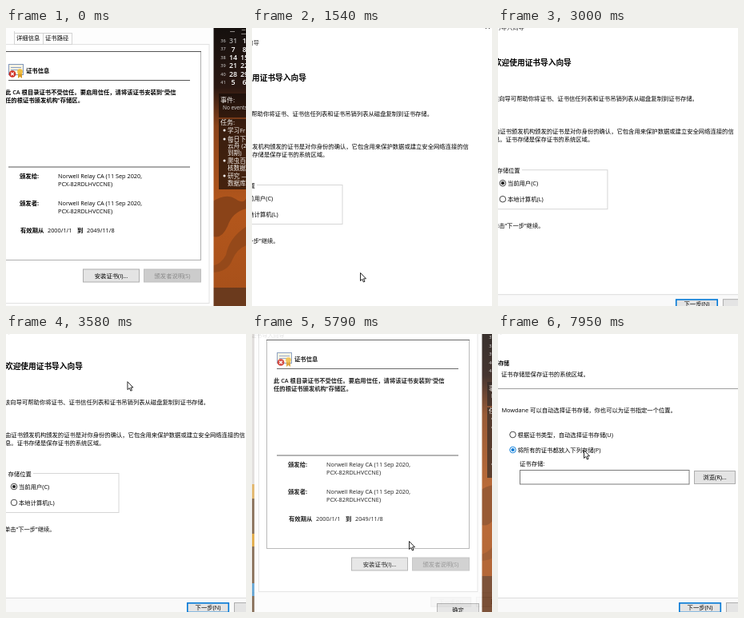
An HTML page that plays this animation: 300 by 348 pixels, repeating every 8000 ms.

```html
<!DOCTYPE html>
<html lang="zh-CN">
<head>
<meta charset="utf-8">
<title>证书导入向导</title>
<style>
  html, body { margin: 0; width: 100%; height: 100%; overflow: hidden; background: #fff; }
  svg { display: block; width: 100vw; height: 100vh; }
  text { font-family: "Open Sans", "Noto Sans CJK SC", "Noto Sans CJK", sans-serif; white-space: pre; }
</style>
</head>
<body>
<svg id="stage" viewBox="0 0 300 348"></svg>
<script>
const LOOP = 8000;
const SIZE = 7.32;
const BLUE = '#0078d7';
const PAPER = '#fdfdfd';

// Drawing helpers; text is placed by its vertical centre.
const text = (x, y, str, { size = SIZE, fill = '#000', weight = 400, anchor = 'start', id = '' } = {}) =>
  `<text id="${id}" x="${x}" y="${y + size * 0.37}" font-size="${size}" font-weight="${weight}" fill="${fill}" text-anchor="${anchor}">${str}</text>`;
const box = (x, y, w, h, fill, stroke = 'none', sw = 1, id = '') =>
  `<rect id="${id}" x="${x}" y="${y}" width="${w}" height="${h}" fill="${fill}" stroke="${stroke}" stroke-width="${sw}"/>`;
const line = (x1, y1, x2, y2, stroke) =>
  `<path d="M${x1} ${y1}L${x2} ${y2}" stroke="${stroke}" stroke-width="1" fill="none"/>`;
const button = (id, x, y, w, h, label, off = false) =>
  box(x + .5, y + .5, w - 1, h - 1, off ? '#ccc' : '#e4e4e4', off ? '#bfbfbf' : '#adadad', 1, id) +
  text(x + w / 2, y + h / 2, label, { anchor: 'middle', fill: off ? '#8a8a8a' : '#000', id: id + 'Label' });
const radio = (id, x, y, label) =>
  `<g id="${id}"><circle cx="${x}" cy="${y}" r="3.8" fill="#fff" stroke="#333" stroke-width=".9"/>
   <circle class="dot" cx="${x}" cy="${y}" r="2.1" fill="#222"/></g>` + text(x + 6, y, label);

function desktop() {
  const weeks = [[36, 31, 1], [37, 7, 8], [38, 14, 15], [39, 21, 22], [40, 28, 29], [41, 5, 6]];
  const white = { fill: '#f4f0ec' };
  const tasks = ['学习Fr', '每日下', '云舟 (2', '到期)', '爬虫百', '核数据', '研究 —', '数据库'];
  const bullets = [0, 1, 4, 6];
  const taskY = [106, 117, 125, 134, 144, 153, 163, 172];
  return `<defs><linearGradient id="sky" x1="0" y1="0" x2="0" y2="1">
      <stop offset="0" stop-color="#15100e"/><stop offset=".2" stop-color="#2b1812"/>
      <stop offset=".33" stop-color="#8a431a"/><stop offset=".6" stop-color="#b4571c"/>
      <stop offset="1" stop-color="#a34e1a"/></linearGradient></defs>
    <g transform="translate(-1 0)">` +
    box(286, -22, 60, 372, 'url(#sky)') +
    `<path d="M286 196Q304 184 316 192T330 188V204Q312 208 306 226Q298 244 286 238Z" fill="#8a4318"/>
     <path d="M330 226Q308 240 304 262Q298 274 286 276V284Q306 284 312 268Q318 254 330 250Z" fill="#95491a"/>` +
    box(286, 303, 60, 47, '#6b3a1d') +
    box(295, 60, 40, 30, '#120b08aa') + box(295, 92, 40, 88, '#120b08aa') +
    text(312, -17, '一', { size: 6.5, ...white, anchor: 'middle' }) +
    text(326, -17, '二', { size: 6.5, ...white, anchor: 'middle' }) +
    weeks.map((row, i) => {
      const y = -6 + i * 10.4;
      const day = { size: 8.8, weight: 600, anchor: 'middle' };
      return text(300.5, y, row[0], { size: 5.6, fill: '#ddd', anchor: 'middle' }) +
        text(313, y, row[1], { ...day, fill: i ? '#fff' : '#aaa' }) +
        text(327, y, row[2], { ...day, fill: '#fff' });
    }).join('') +
    text(297, 68, '事件:', { size: 8, ...white }) +
    text(300, 78, 'No events', { size: 6.5, fill: '#ddd' }) +
    text(297, 96, '任务:', { size: 8, ...white }) +
    tasks.map((s, i) => text(306, taskY[i], s, { size: 7.6, ...white })).join('') +
    bullets.map(i => `<circle cx="302" cy="${taskY[i]}" r="1.5" fill="#fff"/>`).join('') + '</g>' +
    box(-2, -22, 6, 210, '#dedbd8') + box(-2, 188, 6, 162, '#80664d') +
    box(-2, 188, 5, 18, '#e0b060') + box(-2, 250, 5, 16, '#e0a53a') + box(-2, 312, 5, 16, '#5a9fd0');
}

function certificate() {
  const bold = { weight: 700 };
  const issuer = y => text(93, y, 'Norwell Relay CA (11 Sep 2020,') + text(93, y + 10, 'PCX-82RDLHVCCNE)');
  return box(3, -60, 284.5, 440, PAPER) +
    box(8.5, -1.5, 273.5, 324, '#fff', '#e2e2e2') +
    line(38.5, -18, 38.5, -2, '#d4d4d4') +
    box(38.5, -15.5, 36, 14, PAPER, '#d4d4d4') + text(41, -9.5, '详细信息') +
    box(74.5, -15.5, 36, 14, PAPER, '#d4d4d4') + text(77, -9.5, '证书路径') +
    box(18.5, 7.5, 253, 261, '#fff', '#b0b0b0') + line(18, 7.5, 272, 7.5, '#555') +
    line(31, 43.5, 258, 43.5, '#555') + line(31, 152, 258, 152, '#555') +
    box(31.5, 23.5, 18, 13, '#f8f3e2', '#7f96ba') +
    line(34, 27.5, 47, 27.5, '#8aa0c4') + line(34, 30.5, 43, 30.5, '#8aa0c4') +
    `<path d="M43 34V41L45.5 39L48 41V34Z" fill="#d99b25"/><circle cx="45.5" cy="32.5" r="3.3" fill="#efbd42"/>
     <circle cx="36" cy="35.5" r="4.3" fill="#cf2f24"/>
     <path d="M34.2 33.7l3.600 3.600m0-3.600l-3.600 3.600" stroke="#fff" stroke-width="1.3"/>` +
    text(53, 31, '证书信息', bold) +
    text(27, 58, '此 CA 根目录证书不受信任。要启用信任，请将该证书安装到“受信', { weight: 600 }) +
    text(27, 68, '任的根证书颁发机构”存储区。', { weight: 600 }) +
    text(45, 163, '颁发给:', bold) + issuer(163) +
    text(45, 197, '颁发者:', bold) + issuer(197) +
    text(46, 231, '有效期从', bold) + text(80, 231, '2000/1/1') +
    text(117, 231, '到', bold) + text(129, 231, '2049/11/8') +
    button('install', 124, 279.5, 71, 17, '安装证书(I)...') +
    button('issuerNote', 200, 279.5, 72, 17, '颁发者说明(S)', true) +
    button('ok', 231, 337, 53, 16, '确定');
}

const welcomePage = () =>
  text(-1, 40, '欢迎使用证书导入向导', { size: 9.7, weight: 700 }) +
  text(-2, 85.5, '该向导可帮助你将证书、证书信任列表和证书吊销列表从磁盘复制到证书存储。') +
  text(-1, 126, '由证书颁发机构颁发的证书是对你身份的确认，它包含用来保护数据或建立安全网络连接的信') +
  text(-1, 136, '息。证书存储是保存证书的系统区域。') +
  box(-4.5, 174.5, 145.5, 49, 'none', '#d6d6d6') +
  box(0, 170, 34, 9, '#fff') + text(2.5, 175, '存储位置') +
  radio('user', 10, 191, '当前用户(C)') + radio('machine', 10, 211, '本地计算机(L)') +
  text(-2, 244.5, '单击“下一步”继续。');

const storePage = () =>
  text(14, 37, '证书存储', { size: 6.5, weight: 700, anchor: 'end' }) +
  text(4, 50.5, '证书存储是保存证书的系统区域。') +
  line(-60, 68.5, 400, 68.5, '#a0a0a0') +
  text(4.5, 95, 'Mowdane 可以自动选择证书存储，你也可以为证书指定一个位置。') +
  radio('auto', 18.5, 126, '根据证书类型，自动选择证书存储(U)') +
  radio('manual', 18.5, 145, '将所有的证书都放入下列存储(P)') +
  text(27, 162, '证书存储:', { id: 'storeLabel' }) +
  box(27.5, 170.5, 211.5, 17.5, '#fff', '#7a7a7a', 1, 'storeField') +
  button('browse', 245, 171, 52, 17, '浏览(R)...');

const wizard = () =>
  box(-60, -40, 460, 371, '#fff') +
  text(37, -4, '证书导入向导', { anchor: 'end', fill: '#333' }) +
  '<path d="M320 -26l5 5m0-5l-5 5" stroke="#222" stroke-width=".9"/>' +
  `<g id="welcome">${welcomePage()}</g><g id="store">${storePage()}</g>` +
  box(-60, 330, 460, 60, '#f9f9f9') + line(-60, 330.5, 400, 330.5, '#dcdcdc') +
  box(226.8, 336.8, 51.5, 11.6, '#e4e4e4', BLUE, 1.6, 'next') +
  text(252.5, 342.5, '下一步(N)', { anchor: 'middle', id: 'nextLabel' }) +
  `<g id="shield"><path d="M236 337.5Q238 339 240.3 338.7Q240.6 345 236 347Q231.4 345 231.7 338.7Q234 339 236 337.5Z" fill="#2c6fc4"/>
   <path d="M236 337.5Q238 339 240.3 338.7V342.3H236ZM231.7 342.3H236V347Q232 345 231.7 342.3Z" fill="#f5c12e"/></g>` +
  button('cancel', 285, 336, 53, 13, '取消');

document.getElementById('stage').innerHTML =
  `<g id="world">${desktop()}${certificate()}<g id="wizard">${wizard()}</g></g>
   <path id="cursor" d="M.5 .5V10.5L2.8 8.4L4.4 12L6 11.3L4.5 7.8H7.5Z" fill="#fff" stroke="#111" stroke-width=".9"/>`;

const $ = id => document.getElementById(id);
const set = (id, attrs) => { for (const k in attrs) $(id).setAttribute(k, attrs[k]); };
const show = (id, on) => { $(id).style.display = on ? '' : 'none'; };

// Progress in n equal jumps, the first at a and the last at b.
const steps = (t, a, b, n) =>
  t < a ? 0 : Math.min(1, (Math.floor((t - a) * (n - 1) / (b - a) + 1e-6) + 1) / n);
const easeOut = (p, k = 2) => 1 - (1 - p) ** k;

// from, to, jumps, start x, y, end x, y
const moves = [
  [60, 480, 7, 160, 352, 135, 309],
  [1240, 1310, 2, 135, 309, 135, 306],
  [1600, 2050, 7, 135, 306, -40, 226],
  [3450, 4190, 11, 205, 4, 10, 205],
  [4320, 4690, 6, 10, 205, 228, 312],
  [4760, 5060, 5, 228, 312, 256, 343],
  [5270, 5430, 3, 256, 343, 196, 259],
  [6400, 6470, 2, 196, 259, 188, 269],
  [6930, 7520, 9, 188, 269, 100, 143],
  [7670, 7740, 2, 100, 143, 107, 145],
];

function placeCursor(t) {
  const [a, b, n, x0, y0, x1, y1] = moves.findLast(m => m[0] <= t) || moves[0];
  const p = easeOut(steps(t, a, b, n), 1.6);
  set('cursor', { transform: `translate(${x0 + (x1 - x0) * p} ${y0 + (y1 - y0) * p})` });
}

function setRadio(id, on, hot) {
  const [ring, dot] = $(id).children;
  ring.setAttribute('stroke', hot ? BLUE : '#333');
  dot.setAttribute('fill', hot ? BLUE : '#222');
  dot.setAttribute('visibility', on ? 'inherit' : 'hidden');
}

function placeWizard(t) {
  let opacity, scale;
  if (t >= 5650 && t < 6090) {
    const p = steps(t, 5650, 5870, 4);
    opacity = (1 - p) ** 3;
    scale = 1 - 0.07 * p;
  } else {
    opacity = easeOut(t < 5650 ? steps(t, 560, 850, 5) : steps(t, 6090, 6470, 6), 3);
    scale = 1 - 0.08 * (1 - opacity);
  }
  set('wizard', { opacity, transform: `translate(140 140) scale(${scale}) translate(-140 -140)` });
}

function render(t) {
  const pan = 1 - easeOut(steps(t, 2520, 3280, 12), 2.2);
  set('world', { transform: `translate(${-28 * pan} ${22 * pan})` });
  placeWizard(t);
  placeCursor(t);

  // The first page clears as the window closes; the second opens with it.
  const first = t < 5650;
  const second = t >= 6090;
  show('welcome', first);
  show('store', second);

  const local = t >= 4320;
  const shielded = local && first;
  setRadio('user', !local, false);
  setRadio('machine', local, t >= 4120 && t < 4400);
  show('shield', shielded);
  set('nextLabel', { x: shielded ? 257.5 : 252.5, fill: first || second ? '#000' : '#8a8a8a' });
  const overNext = t >= 5060 && t < 5350;
  set('next', { fill: overNext ? '#e5f1fb' : first || second ? '#e4e4e4' : '#ccc', stroke: first || second ? BLUE : '#aaa' });

  const overInstall = t >= 400 && t < 900;
  set('install', { fill: overInstall ? '#e5f1fb' : '#e4e4e4', stroke: overInstall ? BLUE : '#adadad' });

  const manual = t >= 7670;
  setRadio('auto', !manual, false);
  setRadio('manual', manual, t >= 7450);
  set('storeLabel', { fill: manual ? '#000' : '#8a8a8a' });
  set('storeField', { stroke: manual ? '#7a7a7a' : '#c4c4c4' });
  set('browse', { fill: manual ? '#e4e4e4' : '#ccc', stroke: manual ? '#adadad' : '#bfbfbf' });
  set('browseLabel', { fill: manual ? '#000' : '#8a8a8a' });
}

function tick() {
  render(performance.now() % LOOP);
  requestAnimationFrame(tick);
}
tick();
</script>
</body>
</html>
```
